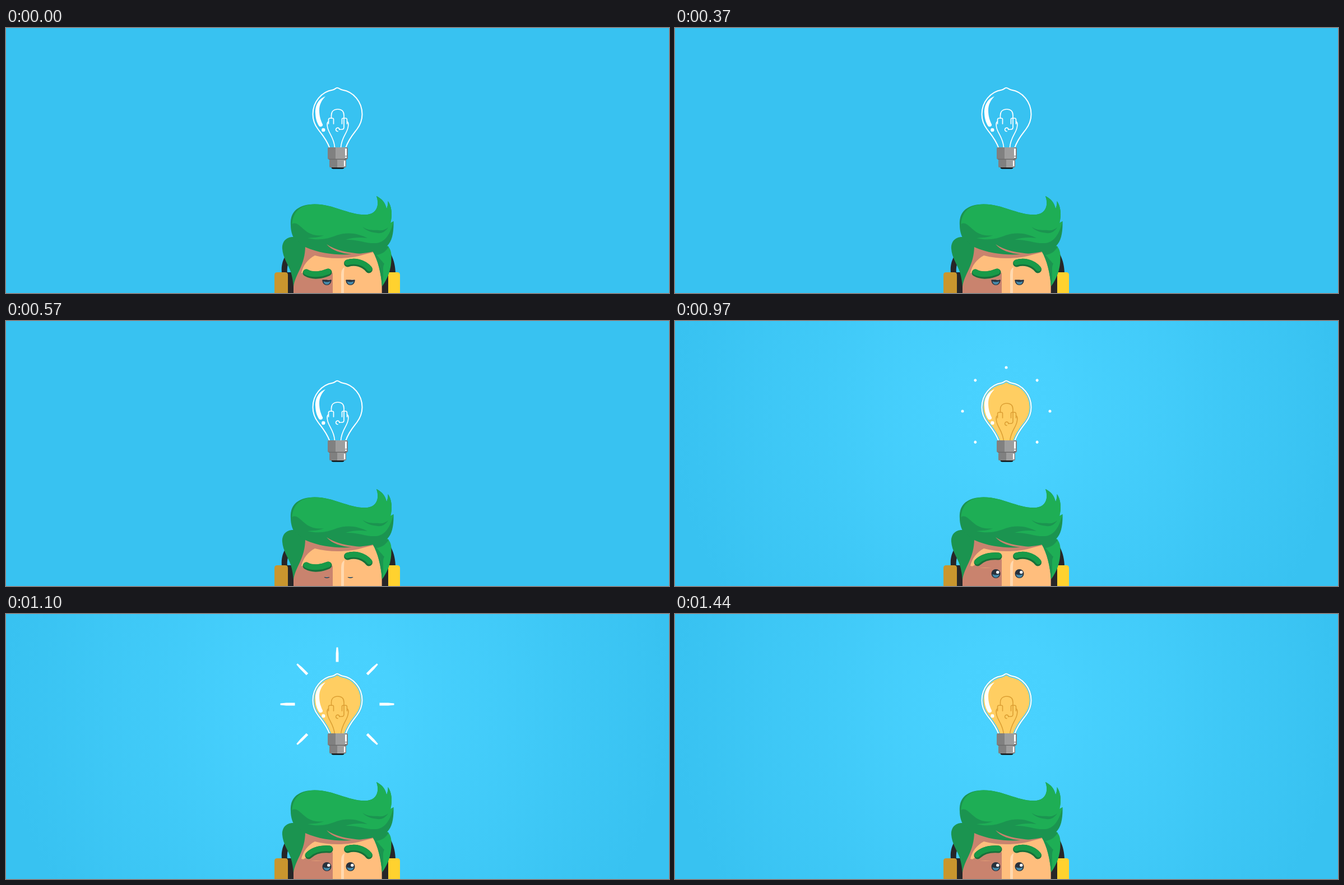
An HTML page for the animation above (1940 ms loop, 1183 by 473 pixels).

```html
<!DOCTYPE html>
<html lang="en">
<head>
<meta charset="utf-8">
<title>Bright idea</title>
<style>
  html, body { margin: 0; width: 100%; height: 100%; overflow: hidden; background: #38c2f1; }
  svg { display: block; width: 100%; height: 100%; }
  .line { fill: none; stroke-linecap: round; stroke-linejoin: round; }
  .skin { fill: #ffbe7d; }
  .shade { fill: #c9836e; }
  .hair { fill: #1eae55; }
  .lock { fill: #1b9450; }
  .brow { stroke: #17703a; stroke-width: 13; }
  .brow + .brow { stroke: #189a48; stroke-width: 10; }
</style>
</head>
<body>
<svg viewBox="0 0 1183 473">
  <defs>
    <radialGradient id="glow" gradientUnits="userSpaceOnUse" cx="591" cy="160" r="600">
      <stop stop-color="#49d2ff"/>
      <stop offset=".18" stop-color="#48d1fe"/>
      <stop offset="1" stop-color="#38c2f1"/>
    </radialGradient>
    <path id="glass" d="M577.5 214C571 197 563 189 557 181C550 172 547.5 163 547.5 154C547.5 132 563 113.5 583 110.5C587 110 588 106.8 591 106.8C594 106.8 596 110 600 110.5C620 113.5 635.5 132 635.5 154C635.5 164 632 173 626 181C620 189 612 197 606 214"/>
    <g id="filament" class="line">
      <path d="M580.5 161V156C580.5 149 585 145 592 145S603 149 603 156V177C603 180 602 181 599 181H595"/>
      <path d="M595 181.5A3.2 3.2 0 1 0 592 184.5"/>
      <path d="M584.5 171V163Q584.5 161 582 161H578Q575.5 161 575.5 164V171M599.5 171V163Q599.5 161 602 161H606Q608.5 161 608.5 164V171"/>
      <path d="M575.5 167C572.5 168 573 172 573.5 176C575 188 585 194 586.5 213M608.5 167C611.5 168 611 172 610.5 176C609 188 599 194 597.5 213"/>
    </g>
    <g id="eye">
      <circle r="8" fill="#28313c"/>
      <path d="M-6 1Q0 3.5 6 1A6 6 0 0 1-6 1Z" fill="#4689a9"/>
      <circle cx="3.3" cy="-2.6" r="2.7" fill="#fff"/>
    </g>
    <clipPath id="lid"><rect id="lidEdge" x="560" width="70" height="30"/></clipPath>
  </defs>

  <rect width="1183" height="473" fill="#38c2f1"/>
  <rect class="lit" width="1183" height="473" fill="url(#glow)"/>

  <!-- bulb -->
  <g class="lit">
    <use href="#glass" fill="#ffce62" stroke="#50cdf2" stroke-width="5.4"/>
    <use href="#filament" y="2" stroke="#dc9f33" stroke-width="1.6"/>
  </g>
  <use class="unlit" href="#filament" stroke="#fff" stroke-width="1.7"/>
  <use href="#glass" fill="none" stroke="#fff" stroke-width="2"/>
  <path fill="#fff" d="M570 122C556 127 551.5 140 552 152C552.4 162 555 169 558 174C560 178 566 176 565 172C562 166 559 158 559 147C559 137 563 129 570 122Z"/>
  <circle cx="566.3" cy="182" r="3.2" fill="#fff"/>
  <g fill="#808080">
    <rect x="574" y="213" width="36" height="21.5" rx="2"/>
    <rect x="577" y="234" width="30" height="15" rx="2"/>
    <path fill="#9e9e9e" d="M588 213H605V234H588ZM591 235H603V249H591Z"/>
    <path fill="#6c6c6c" d="M576 233.5H608V235H576Z"/>
    <path fill="#fff" d="M605 215H608V228H605ZM603 236.5H605.5V247H603Z"/>
    <circle cx="606.5" cy="230.5" r="1.6" fill="#fff"/>
    <path fill="#111" d="M580.5 249H603.5Q603 251.5 600 251.5H584Q581 251.5 580.5 249Z"/>
  </g>
  <g id="rays" fill="#fff" transform="translate(591 161)"></g>

  <!-- headphones -->
  <path fill="#272628" d="M500 404C493 415 491 425 492 437H502C501 428 503 418 509 410ZM687 404C693 416 694.5 426 695 437H682V420ZM502 436H516V473H502ZM669 440L683 430V473H669Z"/>
  <path fill="#c9962e" d="M484 436H498Q503 436 503 441V473H479V441Q479 436 484 436Z"/>
  <path fill="#ffd22f" d="M682 436H698Q703 436 703 441V473H682Z"/>

  <!-- face -->
  <path class="shade" d="M513 473V455L525 385H660L670.5 455V473Z"/>
  <path class="skin" d="M551 406C538 413 530 424 527 437Q553 444 583 437V473H670.5V455C670 435 664 415 656 400L640 404C616 412 580 414 551 406Z"/>
  <path fill="#ffd9b0" d="M598 473V440Q598 430 604 427Q603 433 603 440V473Z"/>
  <path class="shade lit" d="M537 434Q555 419 583 425V440H527Z"/>

  <!-- hair -->
  <path class="lock" d="M514 373C498 372 492 384 493 394C494 410 504 423 508 435C511 444 512 453 513 462C516 438 534 425 534 388Z"/>
  <path class="hair" d="M654 398C664 415 669 437 671 461C681 448 688 430 687.5 410C688 400 686 393 679 387Z"/>
  <path class="lock" d="M654 398C664 415 669 437 671 461C676 446 670 428 675 421C669 414 663 407 661 405C671 404 679 398 683 390L670 390Z"/>
  <path class="lock" d="M508 352C506 325 525 315 550 314.5C585 314 615 336 645 333C661 331 667 317 661 300C671 305 677 312 679 323C681 318 682 313 681.5 309C688 318 690 333 686 348L691.5 345C692 365 689 381 680 389C672 397 664 400 655 399C620 406 575 409 534 391L514 376C510 369 508 360 508 352Z"/>
  <path class="hair" d="M510.500 350C520 343 530 362 543 367C552 371 560 371 567 370C560 374 548 374 538 375C560 380 575 376 590 370C610 363 630 367 645 375C630 373 618 374 606 378C630 377 640 385 660 384C676 383 686 368 691.500 345L684 349L686 348C690 333 688 318 681.500 309C682 313 681 318 679 323C677 312 671 305 661 300C667 317 661 331 645 333C615 336 585 314 550 314.500C528 315 512 326 510.500 350Z"/>
  <path class="lock" d="M636 355C649 363 658 360 665 361C672 362 677 360 682 356C676 365 669 367 663 366C654 365 644 363 636 355Z"/>
  <path class="shade" d="M572 386C588 397 610 401 634 403Q625 405 616 404C598 402 581 397 572 386Z"/>

  <!-- eyes and brows -->
  <g clip-path="url(#lid)">
    <use href="#eye" x="572.5" y="451"/>
    <use href="#eye" x="614.500" y="451"/>
    <path id="lashes" fill="#28313c" d="M564.5 449.5H580.5V451.3H564.5ZM606.500 449.5H622.5V451.3H606.500Z"/>
  </g>
  <g class="line">
    <g class="unlit">
      <path class="brow" d="M536 437C548 444 564 441 575 436"/>
      <path class="brow" d="M535.500 435.500C548 442 564 439 575 434.500"/>
    </g>
    <g class="lit">
      <path class="brow" d="M540 431C550 421 563 419 577 420"/>
      <path class="brow" d="M539 429.500C549 420 563 417.500 577.500 418.500"/>
    </g>
    <path class="brow" d="M609.500 420C622 416 638 419 647.500 431"/>
    <path class="brow" d="M609 418.500C622 414.500 639 417.500 648.500 429.500"/>
  </g>
</svg>
<script>
  const LOOP = 1940, LIT = 970;
  const byId = id => document.getElementById(id);
  const show = (el, on) => { el.style.display = on ? '' : 'none'; };
  const within = (t, from, to) => t >= from && t < to;

  // Each burst goes from near dots to full strokes to far dots.
  const bursts = [
    { from: 970, to: 1100, shape: '<circle cx="78" r="2.5"/>' },
    { from: 1100, to: 1240, shape: '<path d="M75.5-2.4H91L101.5-1.4V1.4L91 2.4H75.5Z"/>' },
    { from: 1240, to: 1440, shape: '<circle cx="99" r="2.5"/>' }
  ];
  const angles = [-225, -180, -135, -90, -45, 0, 45];
  byId('rays').innerHTML = bursts.map(b => '<g>' + angles.map(a =>
    `<g transform="rotate(${a})">${b.shape}</g>`).join('') + '</g>').join('');

  const lit = document.querySelectorAll('.lit');
  const unlit = document.querySelectorAll('.unlit');
  const rayGroups = [...byId('rays').children];

  function draw(now) {
    const t = now % LOOP;
    const on = t >= LIT;
    const blink = within(t, 200, 370) || within(t, 570, 740);
    lit.forEach(el => show(el, on));
    unlit.forEach(el => show(el, !on));
    show(byId('lashes'), !on);
    byId('lidEdge').setAttribute('y', on ? 440 : blink ? 457 : 449.5);
    bursts.forEach((b, i) => show(rayGroups[i], within(t, b.from, b.to)));
  }

  const start = performance.now();
  function tick() {
    draw(performance.now() - start);
    requestAnimationFrame(tick);
  }
  tick();
</script>
</body>
</html>
```
